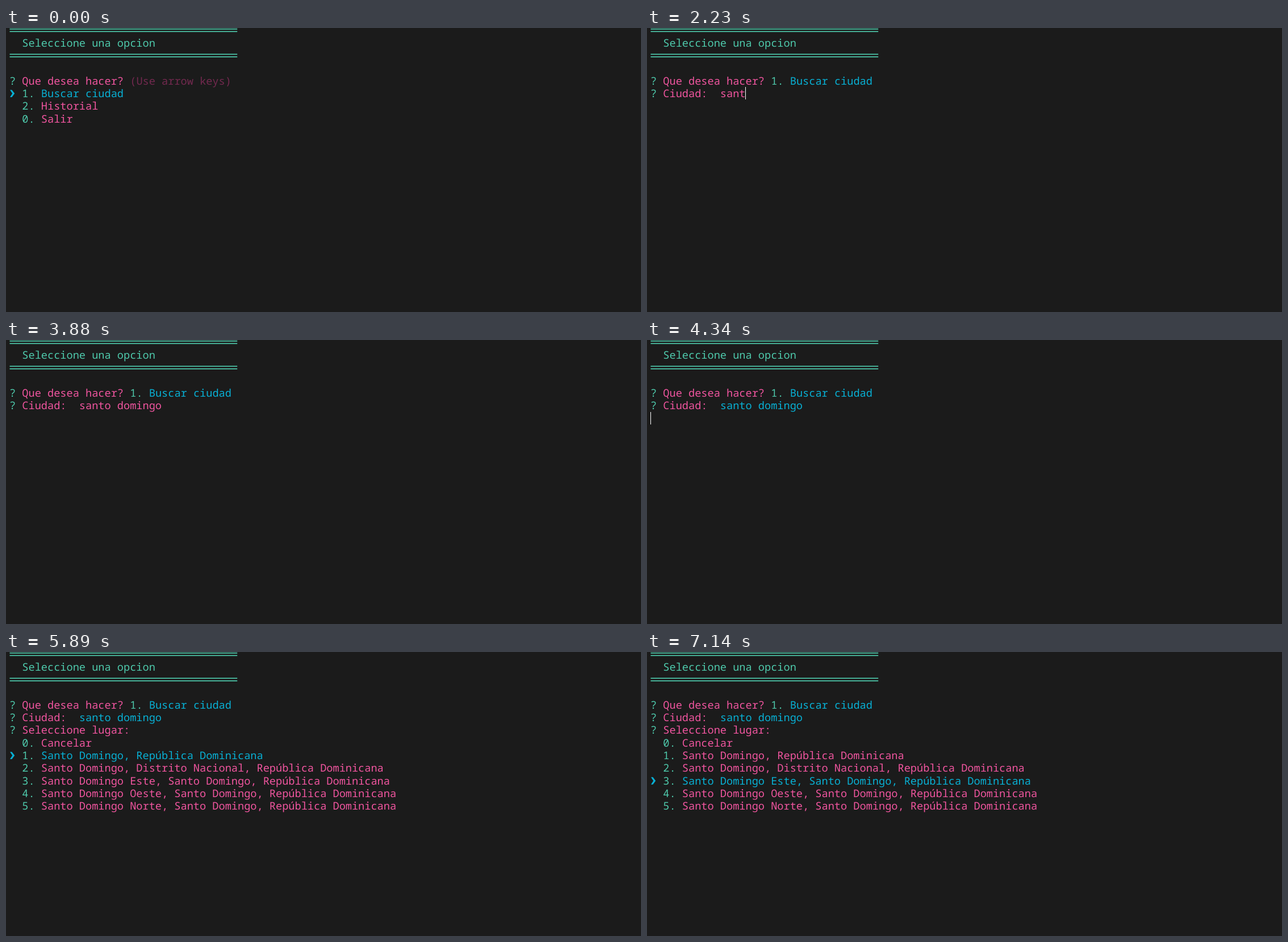
These frames come from a looping animation (1118 by 501 pixels, 7990 ms). An HTML page:

```html
<!DOCTYPE html>
<html lang="es">
<head>
<meta charset="utf-8">
<title>Terminal</title>
<style>
  html, body { margin: 0; width: 100%; height: 100%; overflow: hidden; background: #1b1b1b; }
  svg { display: block; width: 1118px; height: 501px; }
  text {
    font: 500 18.62px "Noto Sans Mono", "DejaVu Sans Mono", monospace;
    font-variant-ligatures: none;
    text-rendering: geometricPrecision;
    white-space: pre;
  }
  .green { fill: #4ec9ab; }
  .pink { fill: #f0559f; }
  .cyan { fill: #08b0d4; }
  .dim { fill: #73294f; }
  .caret { fill: #fff; }
</style>
</head>
<body>
<svg id="screen" viewBox="0 0 1118 501"></svg>
<script>
const LOOP = 7990;
const CELL = 11.17, LINE = 22.335, LEFT = 6, TOP = -7.4;
const screen = document.getElementById('screen');

const colX = col => LEFT + col * CELL;
const rowY = row => TOP + row * LINE;

const text = (row, col, tone, str) =>
  `<text class="${tone}" x="${colX(col).toFixed(2)}" y="${(rowY(row) + 17.6).toFixed(2)}">${str}</text>`;

const bar = y => `<rect class="green" x="6.5" y="${y}" width="400.7" height="1.7"/>`;

const caret = (row, col) =>
  `<rect class="caret" x="${Math.floor(colX(col))}" y="${Math.round(rowY(row))}" width="1" height="22"/>`;

const pointer = row =>
  `<path class="cyan" transform="translate(0 ${(rowY(row) + 11.3).toFixed(2)})"
    d="M7 -6.4H10.4L15.2 0L10.4 6.4H7L11.2 0Z"/>`;

const prompt = (row, label) => text(row, 0, 'green', '?') + text(row, 2, 'pink', label);
const hint = (row, col) => text(row, col, 'dim', '(Use arrow keys)');

const menu = (row, items, active) => items.map(([key, label], i) =>
  (i === active ? pointer(row + i) : '') +
  text(row + i, 2, 'green', key + '.') +
  text(row + i, 5, i === active ? 'cyan' : 'pink', label)).join('');

const actions = [[1, 'Buscar ciudad'], [2, 'Historial'], [0, 'Salir']];
const city = 'santo domingo';
const places = [
  'Cancelar',
  'Santo Domingo, República Dominicana',
  'Santo Domingo, Distrito Nacional, República Dominicana',
  'Santo Domingo Este, Santo Domingo, República Dominicana',
  'Santo Domingo Oeste, Santo Domingo, República Dominicana',
  'Santo Domingo Norte, Santo Domingo, República Dominicana'
].map((label, i) => [i, label]);

const header = bar(1) + bar(5.4) + text(1, 2, 'green', 'Seleccione una opcion') +
  bar(45.5) + bar(50) + prompt(4, 'Que desea hacer?');
const chosen = header + text(4, 19, 'green', '1.') + text(4, 22, 'cyan', 'Buscar ciudad');
const asked = chosen + prompt(5, 'Ciudad:');
const answered = asked + text(5, 11, 'cyan', city);

const start = () => header + hint(4, 19) + menu(5, actions, 0);
const typing = (n, lit = true) =>
  asked + text(5, 11, 'pink', city.slice(0, n)) + (lit ? caret(5, 11 + n) : '');
const cleared = () => chosen + caret(5, 0);
const waiting = () => answered + caret(6, 0);
const picking = (active, help = '') =>
  answered + prompt(6, 'Seleccione lugar:') + help + menu(7, places, active);

const steps = [
  [0, start()],
  [1070, typing(0)],
  [1680, typing(0, false)],
  [1760, typing(1)],
  [1840, typing(2)],
  [2070, typing(3)],
  [2230, typing(4)],
  [2390, typing(5)],
  [2550, typing(6)],
  [2710, typing(7)],
  [2790, typing(8)],
  [2950, typing(9)],
  [3030, typing(10)],
  [3100, cleared()],
  [3170, typing(12)],
  [3260, typing(13)],
  [3880, typing(13, false)],
  [4340, waiting()],
  [4730, picking(0, hint(6, 20))],
  [5890, picking(1)],
  [6910, picking(2)],
  [7140, picking(3)]
];

const origin = performance.now();
let shown = -1;

function draw() {
  const t = Math.max(0, performance.now() - origin) % LOOP;
  let now = steps.length - 1;
  while (steps[now][0] > t) now--;
  if (now !== shown) {
    screen.innerHTML = steps[now][1];
    shown = now;
  }
  requestAnimationFrame(draw);
}
draw();
</script>
</body>
</html>
```
